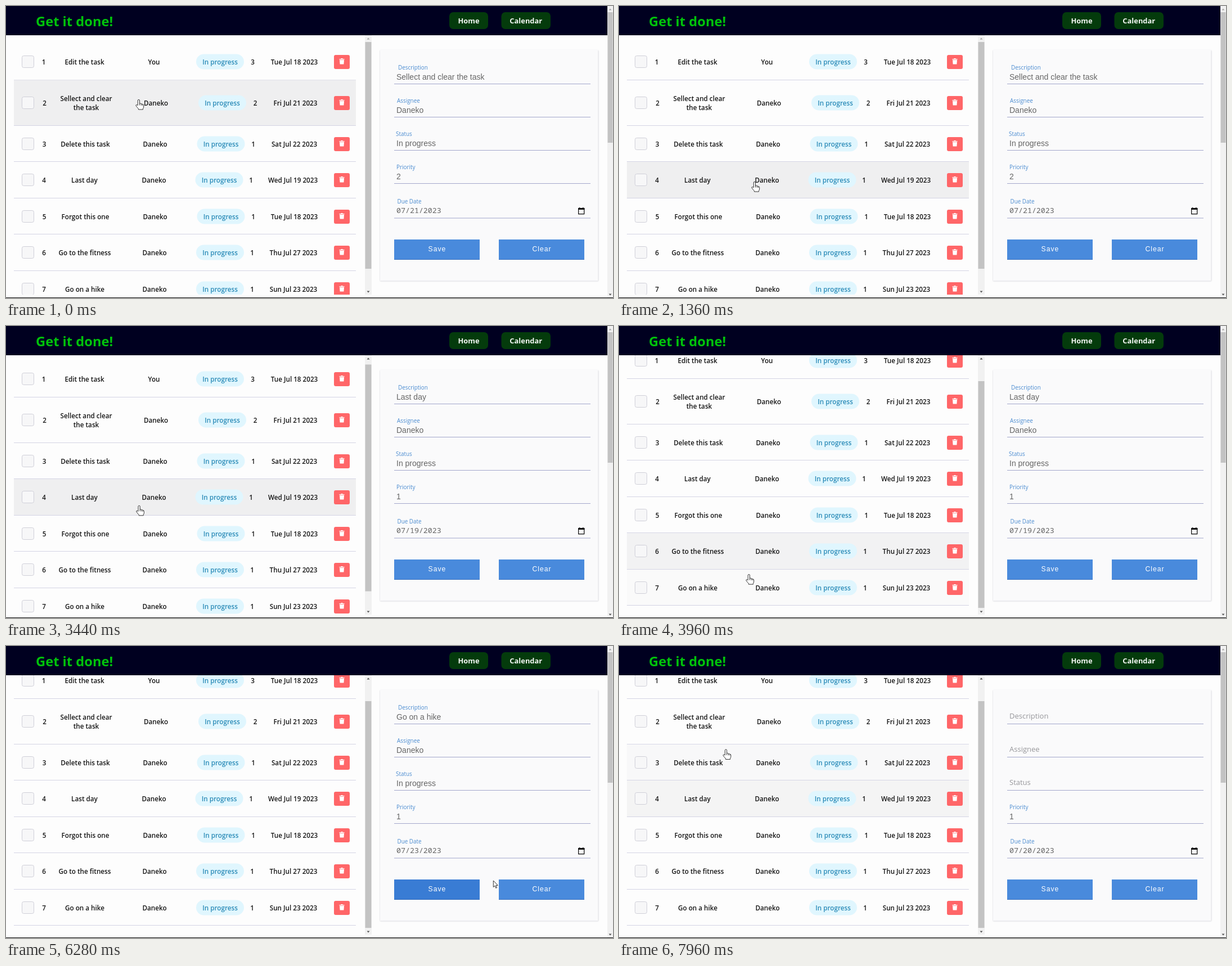
An HTML page with a canvas that plays this animation: 1079 px wide and 519 px high, repeating every 8000 ms.

```html
<!DOCTYPE html>
<html lang="en">
<head>
<meta charset="utf-8">
<title>Get it done!</title>
<style>
html, body { margin: 0; width: 100%; height: 100%; overflow: hidden; background: #fdfdfd; }
canvas { display: block; width: 1079px; height: 519px; }
</style>
</head>
<body>
<canvas id="stage" width="1079" height="519"></canvas>
<script>
const ctx = document.getElementById('stage').getContext('2d');
const LOOP = 8000, FADE = 300, MAX_SCROLL = 38;
const UI = '"Open Sans", "Noto Sans", sans-serif';
const ARIAL = '"Liberation Sans", Arial, sans-serif';
const MONO = '"Noto Sans Mono", "DejaVu Sans Mono", monospace';
const NAME = 'Daneko';

// cols: centres of number, task, assignee, status, priority, date
const rows = [
  { task: ['Edit the task'], who: 'You', prio: 3, date: 'Tue Jul 18 2023', cols: [67, 139.5, 263, 380.5, 438.5, 512.5] },
  { task: ['Sellect and clear', 'the task'], who: NAME, prio: 2, date: 'Fri Jul 21 2023', cols: [68.5, 142.5, 266.5, 384.5, 443, 514.5] },
  { task: ['Delete this task'], who: NAME, prio: 1, date: 'Sat Jul 22 2023', cols: [68, 141, 265, 382, 439.5, 512.5] },
  { task: ['Last day'], who: NAME, prio: 1, date: 'Wed Jul 19 2023', cols: [67.5, 139.5, 263, 379, 435.5, 510] },
  { task: ['Forgot this one'], who: NAME, prio: 1, date: 'Tue Jul 18 2023', cols: [68, 141, 265, 382, 439.5, 512.5] },
  { task: ['Go to the fitness'], who: NAME, prio: 1, date: 'Thu Jul 27 2023', cols: [67.5, 140, 264, 380.5, 437.5, 511] },
  { task: ['Go on a hike'], who: NAME, prio: 1, date: 'Sun Jul 23 2023', cols: [67.5, 140, 264, 380.5, 437.5, 511] }
];
let edge = 67;
for (const row of rows) {
  row.top = edge;
  edge += row.task.length > 1 ? 81 : 64.55;
  row.bottom = edge;
}

const buttons = [
  { label: 'Save', x: 690, y: 415, w: 152, h: 36 },
  { label: 'Clear', x: 876, y: 415, w: 152, h: 36 }
];

// time, description, priority, date
const CLEARED = 6900;
const formStates = [
  [0, 'Sellect and clear the task', 2, '07/21/2023'],
  [1720, 'Last day', 1, '07/19/2023'],
  [4640, 'Go on a hike', 1, '07/23/2023'],
  [CLEARED, '', 1, '07/20/2023']
];

// time, x, y of the pointer
const path = [
  [0, 236, 167], [420, 236, 167], [1000, 241, 313], [1400, 241, 313],
  [1900, 237, 313], [3400, 237, 313], [3600, 234, 390], [3960, 231, 442], [4200, 228, 462],
  [5300, 228, 462], [6000, 760, 424], [6280, 866, 417], [6600, 945, 430],
  [7300, 945, 430], [7610, 625, 298], [7850, 230, 240], [7960, 190.5, 185], [8000, 180, 162]
];

const clamp = v => Math.min(1, Math.max(0, v));
const smooth = v => { v = clamp(v); return v * v * (3 - 2 * v); };
const mix = (a, b, k) => a + (b - a) * k;

function slope(i, axis) {
  const a = path[i - 1], p = path[i], b = path[i + 1];
  if (!a || !b) return 0;
  const still = q => q[1] === p[1] && q[2] === p[2];
  return still(a) || still(b) ? 0 : (b[axis] - a[axis]) / (b[0] - a[0]);
}

function pointer(t) {
  let i = 0;
  while (i < path.length - 2 && t >= path[i + 1][0]) i++;
  const a = path[i], b = path[i + 1], span = b[0] - a[0], u = (t - a[0]) / span;
  const at = axis => {
    const m0 = slope(i, axis) * span, m1 = slope(i + 1, axis) * span;
    return mix(a[axis], b[axis], u * u * (3 - 2 * u))
      + u * (1 - u) * ((1 - u) * m0 - u * m1);
  };
  return { x: at(1), y: at(2) };
}

const scrollAt = t => MAX_SCROLL * smooth((t - 3400) / 180);

function hoverAt(t) {
  const { x, y } = pointer(t), listY = y + scrollAt(t);
  const inList = x > 14 && x < 622 && y > 52 && y < 513;
  return inList
    ? rows.find(r => listY >= r.top && listY < r.bottom)
    : buttons.find(b => x >= b.x && x <= b.x + b.w && y >= b.y && y <= b.y + b.h);
}

// Linear fades: share of the last FADE ms spent over each item
function hoverLevels(t) {
  const levels = new Map(), steps = 30;
  for (let i = 0; i < steps; i++) {
    const item = hoverAt(Math.max(0, t - (i + 0.5) * FADE / steps));
    if (item) levels.set(item, (levels.get(item) || 0) + 1 / steps);
  }
  return levels;
}

function rect(x, y, w, h, fill) {
  ctx.fillStyle = fill;
  ctx.fillRect(x, y, w, h);
}

function round(x, y, w, h, r, fill, stroke) {
  ctx.beginPath();
  ctx.roundRect(x, y, w, h, r);
  if (fill) { ctx.fillStyle = fill; ctx.fill(); }
  if (stroke) { ctx.strokeStyle = stroke; ctx.lineWidth = 1; ctx.stroke(); }
}

function text(str, x, y, font, fill, align = 'center') {
  ctx.font = font;
  ctx.fillStyle = fill;
  ctx.textAlign = align;
  ctx.fillText(str, x, y);
}

function triangle(x, y, dir, fill) {
  ctx.beginPath();
  ctx.moveTo(x - 2.5, y + dir * 1.5);
  ctx.lineTo(x + 2.5, y + dir * 1.5);
  ctx.lineTo(x, y - dir * 1.5);
  ctx.fillStyle = fill;
  ctx.fill();
}

function scrollbar(x, w, top, bottom, thumbY, thumbH, upFill) {
  rect(x, top, w, bottom - top, '#f1f1f1');
  rect(x + 0.5, thumbY, w - 1, thumbH, '#c3c3c3');
  triangle(x + w / 2, top + 6, 1, upFill);
  triangle(x + w / 2, bottom - 5, -1, '#555');
}

function trash(x, y) {
  round(x - 14, y - 12, 28, 25, 3, '#ff6668');
  rect(x - 4.5, y - 5, 9, 1.3, '#fff');
  rect(x - 1.5, y - 6, 3, 1.2, '#fff');
  ctx.beginPath();
  ctx.moveTo(x - 4, y - 3);
  ctx.lineTo(x + 4, y - 3);
  ctx.lineTo(x + 3.4, y + 4.6);
  ctx.lineTo(x - 3.4, y + 4.6);
  ctx.fillStyle = '#fff';
  ctx.fill();
}

function drawRow(row, index, level) {
  const { cols } = row, mid = Math.round((row.top + row.bottom) / 2), base = mid + 5;
  const font = '600 11.7px ' + UI, ink = '#161616';
  if (level) {
    ctx.globalAlpha = level;
    rect(14, row.top, 608, row.bottom - row.top, '#efeff0');
    ctx.globalAlpha = 1;
  }
  rect(14, Math.round(row.bottom) - 1, 608, 1, '#d4d4e4');
  round(28.5, mid - 10.5, 21, 21, 3, '#f7f7f8', '#cfcfd8');
  text(index + 1, cols[0], base, font, ink);
  row.task.forEach((line, i) =>
    text(line, cols[1], base + (i - (row.task.length - 1) / 2) * 16, font, ink));
  text(row.who, cols[2], base, font, ink);
  round(cols[3] - 42.5, mid - 13.5, 85, 27, 13.5, '#e0f6fe');
  text('In progress', cols[3], base, font, '#2c8cb8');
  text(row.prio, cols[4], base, font, ink);
  text(row.date, cols[5], base, font, ink);
  trash(597, mid);
}

function drawList(t, levels) {
  const shift = scrollAt(t);
  ctx.save();
  ctx.beginPath();
  ctx.rect(0, 52, 638, 461);
  ctx.clip();
  ctx.translate(0, -shift);
  rows.forEach((row, i) => drawRow(row, i, levels.get(row)));
  ctx.restore();
  scrollbar(638, 12, 52, 513, 64 + shift * 34 / MAX_SCROLL, 403, shift > 1 ? '#555' : '#a8a8a8');
}

function drawHeader() {
  rect(0, 0, 1069, 52, '#000020');
  text('Get it done!', 53, 35.5, 'bold 23.7px ' + UI, '#00c30a', 'left');
  for (const [label, x, w] of [['Home', 788, 69], ['Calendar', 880.5, 87.5]]) {
    round(x, 11, w, 30, 7, '#043b0c');
    text(label, x + w / 2, 31.3, 'bold 12.9px ' + UI, '#f4f8f4');
  }
}

function field(label, labelX, y, value, rest = 0) {
  const shade = (a, b) => Math.round(mix(a, b, rest));
  const color = `rgb(${shade(74, 150)},${shade(139, 150)},${shade(208, 154)})`;
  text(label, mix(labelX, 694, rest), y + mix(-25.3, -9.3, rest),
    mix(9.9, 13, rest) + 'px ' + UI, color, 'left');
  text(value, 694, y - 7.5, '14px ' + ARIAL, '#666', 'left');
  rect(690, y, 349, 1, '#a3a7cc');
}

function calendarIcon(x, y) {
  ctx.strokeStyle = '#111';
  ctx.lineWidth = 1.3;
  ctx.strokeRect(x + 0.7, y + 1.7, 10, 10);
  rect(x, y + 1, 11.4, 3, '#111');
  rect(x + 1.8, y, 1.5, 2, '#111');
  rect(x + 8, y, 1.5, 2, '#111');
}

function drawForm(t, levels) {
  ctx.save();
  ctx.shadowColor = 'rgba(40,40,70,.22)';
  ctx.shadowBlur = 2;
  ctx.shadowOffsetY = 0.5;
  rect(665, 78, 387.5, 410.5, '#fafafb');
  ctx.restore();
  const [, task, prio, date] = formStates.findLast(s => t >= s[0]);
  const rest = smooth((t - CLEARED) / 200);
  field('Description', 697, 138, task, rest);
  field('Assignee', 695, 197, task && NAME, rest);
  field('Status', 693, 256, task && 'In progress', rest);
  field('Priority', 694, 315, prio);
  field('Due Date', 695.5, 376.5, '');
  text(date, 694, 368.3, '13.3px ' + MONO, '#666', 'left');
  calendarIcon(1017, 358);
  for (const b of buttons) {
    rect(b.x, b.y, b.w, b.h, '#498adc');
    ctx.globalAlpha = levels.get(b) || 0;
    rect(b.x, b.y, b.w, b.h, '#3477d2');
    ctx.globalAlpha = 1;
    rect(b.x, b.y + b.h - 1, b.w, 1, 'rgba(20,60,130,.35)');
    ctx.letterSpacing = '1px';
    text(b.label, b.x + b.w / 2 + 0.5, b.y + 21.3, '12.2px ' + ARIAL, '#fff');
    ctx.letterSpacing = '0px';
  }
}

const hand = new Path2D('M-1.7 9.5V1a1.6 1.6 0 0 1 3.2 0V6.2q2.4-.8 2.8.8q2-.6 2.4.8q2-.3 2 1.8V12q0 2-1.2 3.4V17H-.6V15.6Q-2.6 13.6-5 10.2Q-5.4 8.4-3.6 8.6Z');
const knuckles = new Path2D('M1.5 6V9.5M4.3 7V9.8M6.7 8V10');
const arrow = new Path2D('M0 0V11.5L2.7 9L4.5 13.3L6.3 12.5L4.6 8.4H8Z');

function drawPointer(t) {
  const { x, y } = pointer(t), over = hoverAt(t);
  ctx.save();
  ctx.translate(x, y);
  ctx.fillStyle = '#fff';
  ctx.strokeStyle = '#333';
  ctx.lineWidth = 1;
  ctx.fill(over ? hand : arrow);
  ctx.stroke(over ? hand : arrow);
  if (over) ctx.stroke(knuckles);
  ctx.restore();
}

function draw(now) {
  const t = now % LOOP, levels = hoverLevels(t);
  rect(0, 0, 1079, 519, '#fdfdfd');
  drawList(t, levels);
  drawForm(t, levels);
  drawHeader();
  scrollbar(1069, 10, 0, 518, 11, 232, '#a8a8a8');
  rect(0, 518, 1079, 1, '#111');
  drawPointer(t);
}

const start = performance.now();
function tick() {
  draw(performance.now() - start);
  requestAnimationFrame(tick);
}
tick();
</script>
</body>
</html>
```
